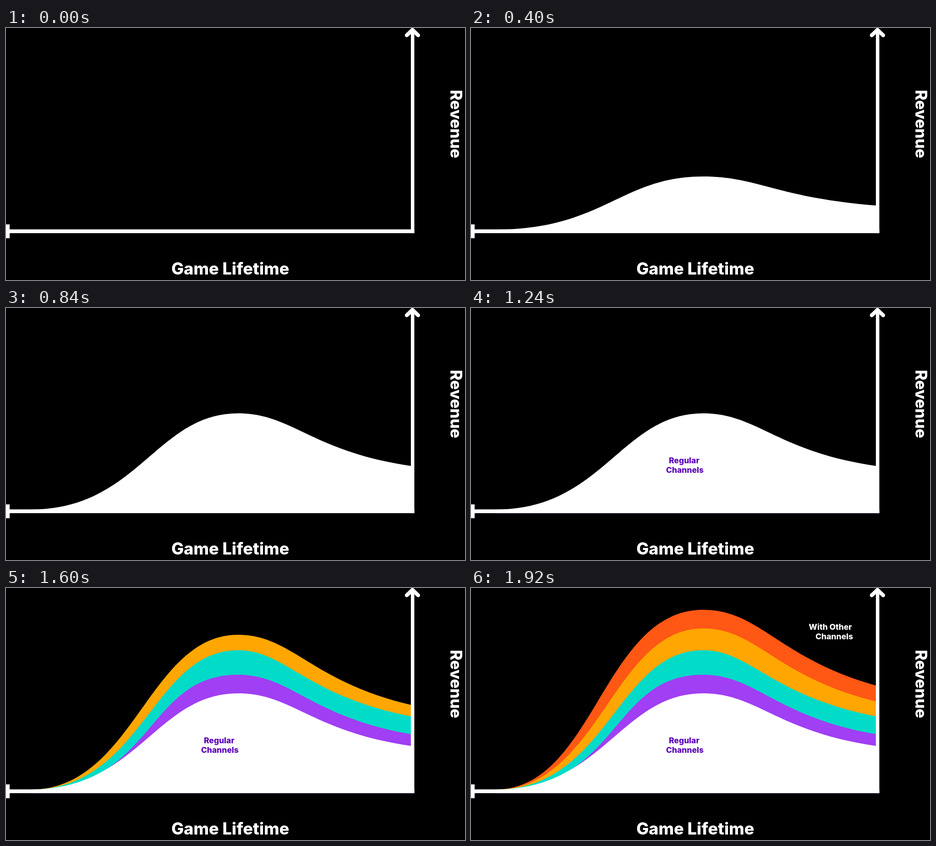
These frames come from a looping animation (1009 by 555 pixels, 2280 ms). An HTML page:

```html
<!DOCTYPE html>
<html lang="en">
<head>
<meta charset="utf-8">
<title>Revenue over game lifetime</title>
<style>
  html, body { margin: 0; width: 100%; height: 100%; overflow: hidden; background: #000; }
  svg { display: block; width: 100vw; height: 100vh; }
  text { font-family: Inter, "Open Sans", sans-serif; font-weight: 800; fill: #fff; text-anchor: middle; }
  .axis { font-size: 36.4px; }
  .side { font-size: 35px; }
  .note { font-size: 17.6px; }
  #regular text { fill: #5b00b8; }
</style>
</head>
<body>
<svg viewBox="0 0 1009 555" preserveAspectRatio="none">
  <rect id="edge" x="54" y="451.8" width="841" height="1" fill="#1c1640"/>
  <g id="layers" transform="translate(0 444)"></g>

  <g fill="#fff">
    <rect y="443.5" width="897.6" height="8.3"/>
    <rect y="432.5" width="8" height="30.5"/>
    <rect x="890" y="5" width="7.6" height="446.8"/>
  </g>
  <path d="M881 16 893.5 4 906 16" fill="none" stroke="#fff" stroke-width="8.5" stroke-linecap="round" stroke-linejoin="round"/>

  <text class="axis" x="493" y="543">Game Lifetime</text>
  <text class="side" transform="translate(977 211.5) rotate(90)">Revenue</text>

  <g id="regular" class="note">
    <text x="468.5" y="342">Regular</text>
    <text x="470" y="363">Channels</text>
  </g>
  <g id="other" class="note">
    <text x="790" y="92">With Other</text>
    <text x="798.5" y="113">Channels</text>
  </g>
</svg>
<script>
const LOOP = 2280, STEP = 40;

// Back to front. peak and end are heights above the axis;
// c1 and c2 shape the rise, c3 the fall.
const layers = [
  { color: "#ff5714", peak: 396, end: 229, c1: 270, c2: 291, c3: 635, start: 1430, dur: 400 },
  { color: "#ffa600", peak: 355, end: 194, c1: 280, c2: 313, c3: 629, start: 1251, dur: 400 },
  { color: "#02dbc8", peak: 307, end: 161, c1: 300, c2: 322, c3: 615, start: 1074, dur: 400 },
  { color: "#a03ff3", peak: 253, end: 122, c1: 328, c2: 305, c3: 627, start: 1040, dur: 400 },
  { color: "#ffffff", peak: 212, end: 96, c1: 290, c2: 330, c3: 630, start: 80, dur: 600 }
];

const byId = id => document.getElementById(id);
const progress = (t, start, dur) => Math.min(1, Math.max(0, (t - start) / dur));
const easeSine = u => (1 - Math.cos(Math.PI * u)) / 2;

function hill({ peak, end, c1, c2, c3 }) {
  const shoulder = end + 0.153 * peak;
  return `M54 0C${c1} 0 ${c2} ${-peak} 510 ${-peak}` +
    `C${c3} ${-peak} ${c3 + 40} ${-shoulder} 891 ${-end}V0Z`;
}

for (const layer of layers) {
  layer.node = document.createElementNS("http://www.w3.org/2000/svg", "path");
  layer.node.setAttribute("d", hill(layer));
  layer.node.setAttribute("fill", layer.color);
  byId("layers").append(layer.node);
}

function draw(now) {
  // The motion runs at 25 steps per second.
  const t = Math.floor((now % LOOP + 0.5) / STEP) * STEP;
  for (const { node, start, dur } of layers) {
    const grow = easeSine(progress(t, start, dur));
    node.setAttribute("transform", `scale(1 ${grow})`);
    node.setAttribute("visibility", grow > 0 ? "visible" : "hidden");
  }
  byId("edge").style.opacity = t >= 1080 ? 1 : 0;
  byId("regular").style.opacity = progress(t, 1040, 200);
  byId("other").style.opacity = progress(t, 1720, 200);
}

function tick(now) {
  draw(now);
  requestAnimationFrame(tick);
}
draw(0);
requestAnimationFrame(tick);
</script>
</body>
</html>
```
